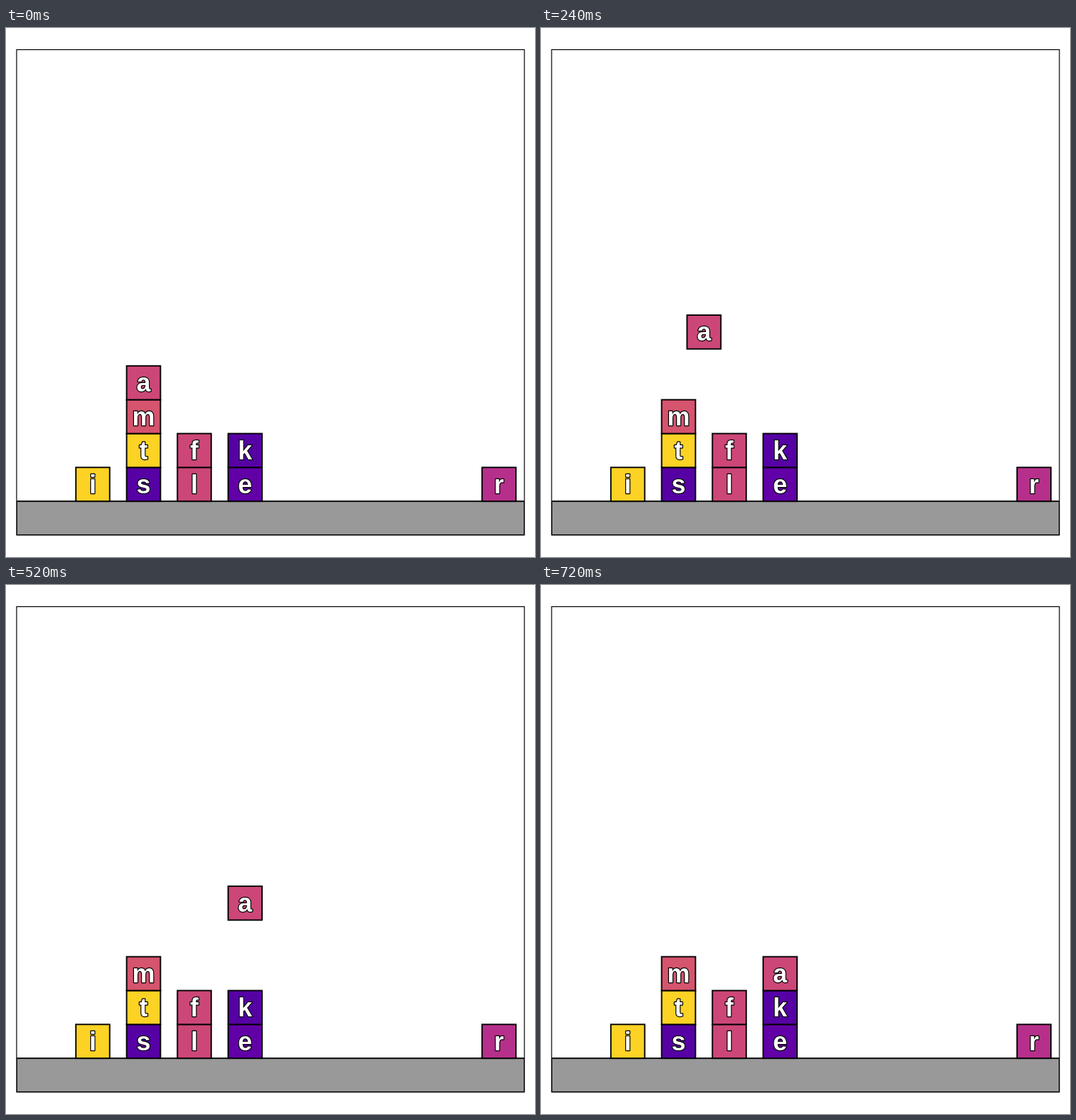
Animation of 748x748 px, one loop 0.76 s. Source, as an HTML page:

```html
<!DOCTYPE html>
<html lang="en">
<head>
<meta charset="utf-8">
<title>Stacking blocks</title>
<style>
  html, body { margin: 0; width: 100%; height: 100%; overflow: hidden; background: #fff; }
  svg { display: block; width: 100vw; height: 100vh; }
  .block { stroke: #000; stroke-width: 1.9; }
  text {
    font: bold 36px "Liberation Sans", Arial, sans-serif;
    text-anchor: middle;
    fill: #fff;
    stroke: #000;
    stroke-width: 2.4;
    stroke-linejoin: round;
    paint-order: stroke;
  }
</style>
</head>
<body>
<svg viewBox="0 0 748 748">
  <defs><clipPath id="area"><rect x="15" y="30.6" width="718" height="686.4"/></clipPath></defs>
  <rect class="block" x="15" y="669.2" width="718" height="47.8" fill="#999" clip-path="url(#area)"/>
  <g id="blocks"></g>
  <rect x="15" y="30.6" width="718" height="686.4" fill="none" stroke="#000" stroke-width="1.2"/>
</svg>
<script>
const NS = "http://www.w3.org/2000/svg";
const LEFT = 15, FLOOR = 669.2, COL = 71.8, SIZE = COL * 2 / 3;
const STEP = 40, STEPS = 19;
const layer = document.getElementById("blocks");

function add(parent, tag, attrs) {
  const el = document.createElementNS(NS, tag);
  for (const key in attrs) el.setAttribute(key, attrs[key]);
  return parent.appendChild(el);
}

function place(block, x, y) {
  block.setAttribute("transform", `translate(${x.toFixed(2)} ${y.toFixed(2)})`);
}

const colX = col => LEFT + COL * (col + 0.5);
const rowY = row => FLOOR - SIZE * (row + 1);

function makeBlock(letter, color, col, row) {
  const g = add(layer, "g", {});
  add(g, "rect", { class: "block", x: -SIZE / 2, y: 0, width: SIZE, height: SIZE, fill: color });
  add(g, "text", { x: 0, y: 36.5 }).textContent = letter;
  place(g, colX(col), rowY(row));
  return g;
}

makeBlock("i", "#fcd225", 1, 0);
makeBlock("s", "#5601a4", 2, 0);
makeBlock("t", "#fcd225", 2, 1);
makeBlock("m", "#d5546e", 2, 2);
makeBlock("l", "#cc4778", 3, 0);
makeBlock("f", "#cc4778", 3, 1);
makeBlock("e", "#6100a7", 4, 0);
makeBlock("k", "#5601a4", 4, 1);
makeBlock("r", "#b6308b", 9, 0);
const mover = makeBlock("a", "#cc4778", 2, 3);

const ramp = (n, from, to) => Math.min(1, Math.max(0, (n - from) / (to - from)));

// Lift, carry two columns right, then lower, in equal steps.
function draw(time) {
  const n = Math.floor(time / STEP) % STEPS;
  const top = rowY(3) - COL;
  const x = colX(2) + 2 * COL * ramp(n, 4, 12);
  const y = rowY(3) - COL * ramp(n, 0, 4) + (rowY(2) - top) * ramp(n, 12, 18);
  place(mover, x, y);
}

const start = performance.now();
function tick() {
  draw(performance.now() - start);
  requestAnimationFrame(tick);
}
tick();
</script>
</body>
</html>
```
